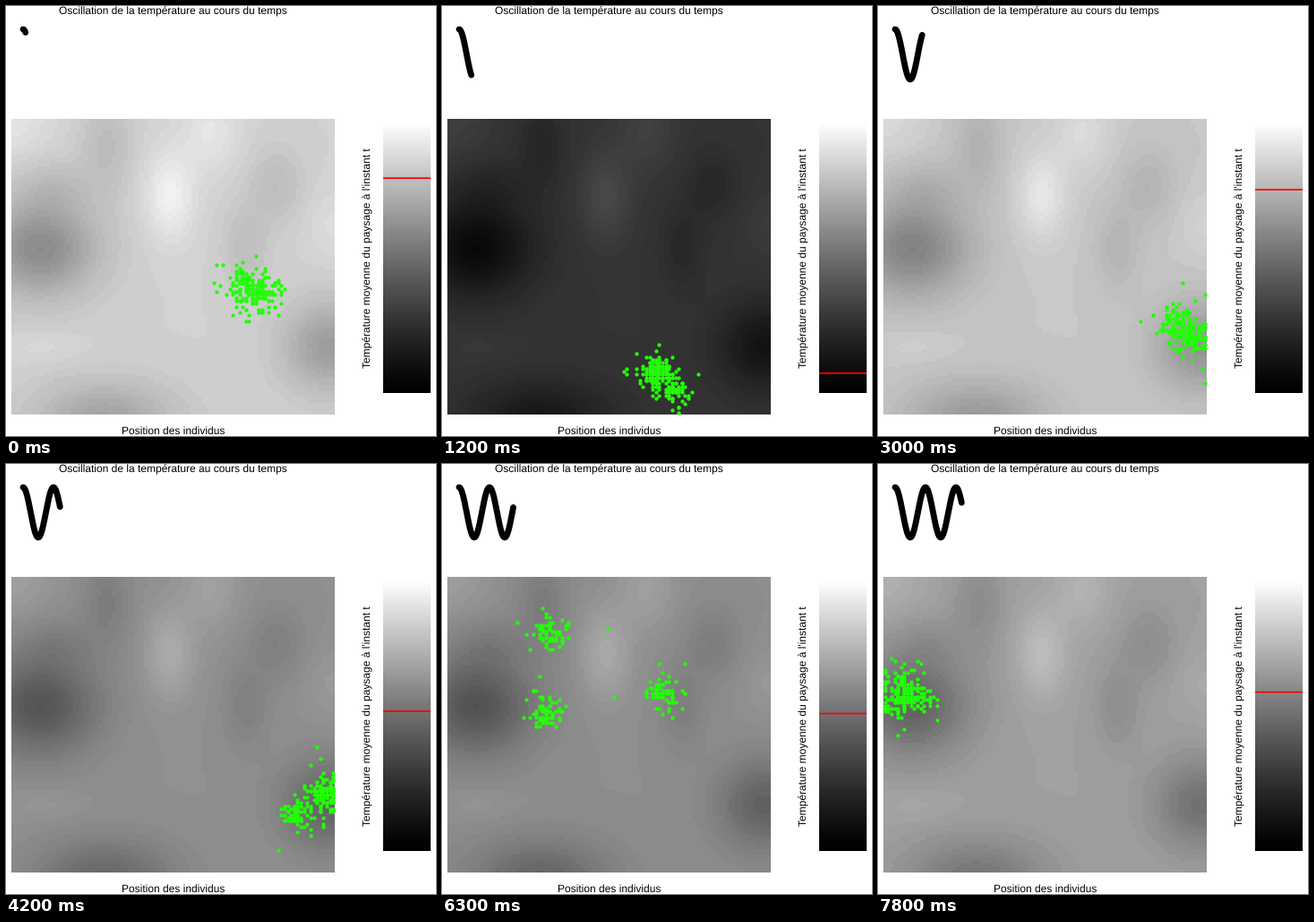
A matplotlib script that plays this animation: 480 by 480 pixels, repeating every 8000 ms.

```python
import matplotlib.pyplot as plt
import numpy as np
from matplotlib.animation import FuncAnimation
from matplotlib.patches import Rectangle

SIZE, DPI = 480, 100
PX = 72 / DPI
LEFT, RIGHT, TOP, BOTTOM = 6, 367, 126, 456
GRID, LEVELS = 100, 22
TICK, STEP_TICKS, TICKS = 100, 3, 80
ORIGIN = np.array([LEFT, TOP])
CELL = np.array([RIGHT - LEFT, BOTTOM - TOP]) / GRID

# Hills and hollows on a flat plain: x, y, width, height, strength
PLAIN = 0.66
BUMPS = [
    (38, 270, 64, 55, -0.64), (360, 380, 52, 50, -0.48),
    (110, 460, 78, 42, -0.42), (112, 155, 28, 55, -0.20),
    (55, 200, 40, 28, -0.14), (302, 200, 30, 42, -0.18),
    (268, 270, 26, 50, -0.17), (183, 212, 28, 50, 0.30),
    (228, 140, 32, 45, 0.19), (5, 130, 45, 40, 0.17),
    (365, 245, 30, 40, 0.10), (40, 380, 45, 20, 0.07),
]

# Route of the three nests of individuals
KEY_STEPS = (0, 4, 10, 14, 17, 21, 26)
NESTS = [
    [(262, 310), (236, 408), (342, 360), (352, 366), (216, 386), (120, 187), (25, 250)],
    [(288, 320), (242, 412), (352, 372), (355, 370), (224, 392), (115, 278), (22, 266)],
    [(272, 318), (258, 428), (332, 354), (322, 390), (243, 406), (248, 254), (42, 262)],
]
NEST_SIZE, SPREAD = 65, 9


def make_landscape():
    x = LEFT + (np.arange(GRID) + 0.5) * CELL[0]
    y = (TOP + (np.arange(GRID) + 0.5) * CELL[1])[:, None]
    height = PLAIN + sum(a * np.exp(-((x - cx) / w) ** 2 - ((y - cy) / h) ** 2)
                         for cx, cy, w, h, a in BUMPS)
    return np.round(np.clip(height, 0, 1) * LEVELS) / LEVELS


def shade(temp):
    low = 66 + 76 * temp + 6 * temp ** 2
    high = 152 + 100 * temp + 8 * temp ** 2
    return np.clip(low + (high - low) * landscape, 0, 255)


def individuals(step):
    rng = np.random.default_rng(step + 11)
    flock = []
    for route in NESTS:
        centre = [np.interp(step, KEY_STEPS, axis) for axis in zip(*route)]
        flock.append(centre + SPREAD * rng.standard_t(5, (NEST_SIZE, 2)))
    cell = np.floor((np.vstack(flock) - ORIGIN) / CELL)
    return ORIGIN + (np.clip(cell, 0, GRID - 1) + 0.5) * CELL


landscape = make_landscape()

plt.rcParams["text.hinting"] = "none"
fig = plt.figure(figsize=(SIZE / DPI, SIZE / DPI), dpi=DPI, facecolor="white")
ax = fig.add_axes([0, 0, 1, 1])
ax.axis("off")

gray = dict(cmap="gray", vmin=0, vmax=255, aspect="auto", interpolation="nearest")
ground = ax.imshow(landscape, extent=(LEFT, RIGHT, BOTTOM, TOP), **gray)
scale = 255 * np.linspace(1, 0, 101)[:, None] ** 1.2
ax.imshow(scale, extent=(421, 474, 432, 129), **gray)
ax.set(xlim=(0, SIZE), ylim=(SIZE, 0))

dots = ax.scatter([], [], s=(4.3 * PX) ** 2, color="#21ff06", linewidths=0, zorder=3)
dots.set_clip_path(Rectangle((LEFT, TOP), RIGHT - LEFT, BOTTOM - TOP,
                             transform=ax.transData))
marker, = ax.plot([], [], color="red", lw=1.7 * PX, solid_capstyle="butt",
                  snap=False, zorder=3)
wave, = ax.plot([], [], color="black", lw=6.8 * PX, solid_capstyle="round",
                solid_joinstyle="round")


def label(x, y, text, rotation=0):
    ax.text(x, y, text, family="Liberation Sans", size=12 * PX, ha="center",
            va="baseline", rotation=rotation, rotation_mode="anchor")


label(186.5, 10, "Oscillation de la température au cours du temps")
label(186.5, 478, "Position des individus")
label(408, 281, "Température moyenne du paysage à l'instant t", 90)


def update(tick):
    step = tick // STEP_TICKS
    phase = 0.507 + 0.509 * step
    temp = np.cos(phase)
    ground.set_data(shade(temp))
    dots.set_offsets(individuals(step))
    level = 304.1 - 128.1 * temp
    marker.set_data([421, 474], [level, level])
    trail = np.linspace(0, phase, 20 + 8 * step)
    wave.set_data(19 + 34 * trail / (2 * np.pi), 54 - 28 * np.cos(trail))
    return ground, dots, marker, wave


anim = FuncAnimation(fig, update, frames=TICKS, interval=TICK, repeat=True,
                     repeat_delay=0, blit=False)
plt.show()
```
